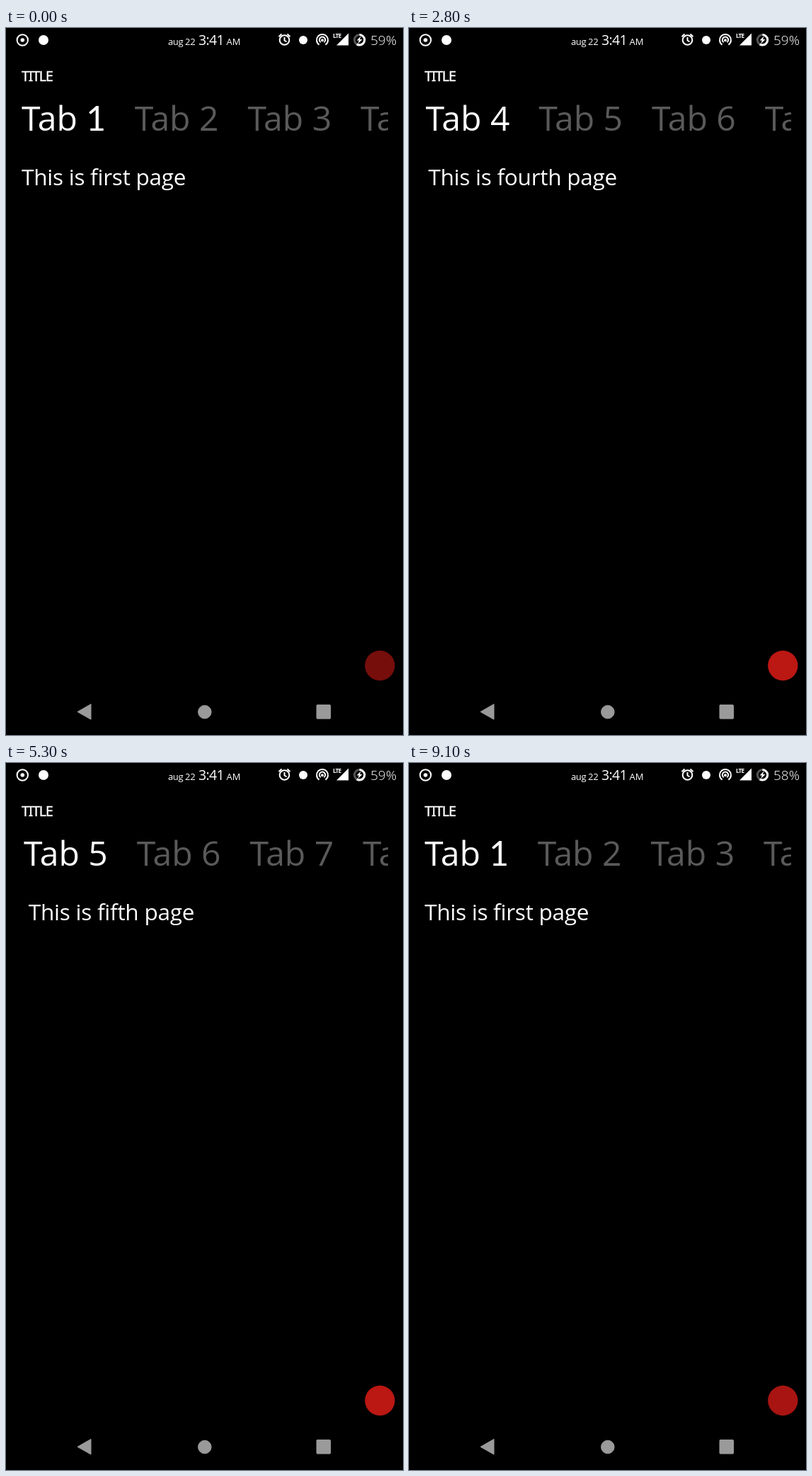
Recreate the animation shown at these times as an HTML page. Size 561x998 px, loop 9.2 s.

```html
<!DOCTYPE html>
<html lang="en">
<head>
<meta charset="utf-8">
<title>Tabs</title>
<style>
html, body { margin: 0; width: 100%; height: 100%; overflow: hidden; background: #000; }
svg { display: block; width: 561px; height: 998px; }
text { font-family: "Open Sans", "Noto Sans", sans-serif; fill: #fff; white-space: pre; }
.thin { font-weight: 300; }
.title { font: 19.5px "Noto Sans", sans-serif; letter-spacing: -1.15px; stroke: #fff; stroke-width: .4px; }
.tab { font-size: 48px; }
.foot { font-family: Lato, sans-serif; }
.page { font-size: 31.5px; letter-spacing: -.25px; }
.line { fill: none; stroke: #fff; stroke-width: 2; }
</style>
</head>
<body>
<svg viewBox="0 0 561 998">
  <defs><clipPath id="view"><rect x="21.5" y="90" width="518.5" height="170"/></clipPath></defs>
  <rect width="561" height="998"/>

  <!-- status bar -->
  <g fill="#fff">
    <circle class="line" cx="23.3" cy="17" r="7.7"/>
    <circle cx="23.3" cy="17" r="2.8"/>
    <circle cx="53" cy="17" r="7"/>
    <text x="229" y="24" font-size="13" letter-spacing="-.4">aug 22</text>
    <text x="272" y="24" font-size="19.5" letter-spacing="-.7">3:41</text>
    <text x="311.5" y="24" font-size="13">AM</text>
    <circle class="line" cx="393.5" cy="17" r="6.8"/>
    <path class="line" d="M385.5 12.2l4-3.6M401.5 12.2l-4-3.6M393.5 13v4.5l3 2" stroke-width="1.6"/>
    <circle cx="420" cy="17" r="6"/>
    <path class="line" d="M442.6 23.6a8 8 0 1 1 8.8 0M444.6 20.2a4.2 4.2 0 1 1 4.8 0"/>
    <circle cx="447" cy="17.2" r="2"/>
    <text x="462" y="14" font-size="8.2" font-weight="700" letter-spacing="-.9">LTE</text>
    <path d="M467 24.5h17v-17z"/>
    <circle class="line" cx="499.5" cy="16.8" r="7.2" style="stroke:#555;stroke-width:3"/>
    <circle class="line" cx="499.5" cy="16.8" r="7.2" pathLength="100" stroke-dasharray="59 100"
      transform="rotate(-90 499.5 16.8)" style="stroke-width:3"/>
    <path d="M501.5 11.5l-6 6h3.2l-1.4 4.8 6.2-6.4h-3.4z"/>
    <text id="charge" class="thin" x="515" y="24" font-size="19">59%</text>
  </g>

  <text class="title" x="22" y="75">TITLE</text>
  <g clip-path="url(#view)">
    <g id="tabs"></g>
    <g id="pages"></g>
  </g>

  <circle id="dot" cx="528.3" cy="900" r="21.2" fill="#bb1713"/>

  <!-- navigation bar -->
  <g fill="#9a9a9a" stroke="#9a9a9a" stroke-linejoin="round">
    <path d="M101 965.3l19-10.9v21.6z"/>
    <circle cx="280.8" cy="965.5" r="9.3"/>
    <rect x="439" y="955.5" width="19.5" height="19.5" rx="1"/>
  </g>
</svg>
<script>
const LOOP = 9200, STEP = 100, TAB_GAP = 159.7, PAGE_GAP = 518;
const ORDINALS = ["first", "second", "third", "fourth", "fifth", "sixth", "seventh", "eighth"];

// start, from, to, duration
const SWIPES = [
  [900, 0, 1, 600], [1615, 1, 2, 600], [2330, 2, 3, 600],
  [2960, 3, 2, 600], [3605, 2, 1, 600],
  [4120, 1, 2, 370], [4490, 2, 3, 370], [4860, 3, 4, 600],
  [5460, 4, 3, 470], [5930, 3, 2, 465], [6395, 2, 1, 600],
  [7600, 1, 0, 600]
];
// header distance left against page distance left on backward swipes
const LAG = [[0, 0], [.034, .19], [.303, .667], [1, 1]];
const PULSE = [[0, 0], [.18, 0], [.45, 1], [.6, 1], [.9, 0], [1, 0]];
const PULSE_PERIOD = 1250, PULSE_START = 2062;

const byId = id => document.getElementById(id);
const tabs = byId("tabs"), pages = byId("pages"), dot = byId("dot"), charge = byId("charge");

function addText(parent, cls, x, y, html) {
  const el = document.createElementNS("http://www.w3.org/2000/svg", "text");
  el.setAttribute("class", cls);
  el.setAttribute("x", x);
  el.setAttribute("y", y);
  el.innerHTML = html;
  parent.append(el);
  return el;
}

const labels = ORDINALS.map((word, i) => {
  const digit = i ? i + 1 : '<tspan class="foot">1</tspan>';
  addText(pages, "page", 22 + i * PAGE_GAP, 222.4, `This is ${word} page`);
  return addText(tabs, "tab", 22 + i * TAB_GAP, 145, "Tab " + digit);
});

function lerpTable(table, x) {
  const i = Math.max(1, table.findIndex(p => p[0] >= x));
  const [x0, y0] = table[i - 1], [x1, y1] = table[i];
  return y0 + (y1 - y0) * (x - x0) / (x1 - x0);
}

function scrollAt(t) {
  const swipe = SWIPES.filter(s => s[0] <= t).pop();
  if (!swipe) return { page: 0, tab: 0 };
  const [start, from, to, time] = swipe;
  const left = (1 - Math.min(1, (t - start) / time)) ** 3;
  const tabLeft = to < from ? lerpTable(LAG, left) : left;
  return { page: to + (from - to) * left, tab: to + (from - to) * tabLeft };
}

function draw(t) {
  const { page, tab } = scrollAt(t);
  const active = Math.round(page);
  tabs.setAttribute("transform", `translate(${-tab * TAB_GAP} 0)`);
  pages.setAttribute("transform", `translate(${-page * PAGE_GAP} 0)`);
  labels.forEach((el, i) => { el.style.fill = i === active ? "#fff" : "#5a5a5a"; });
  const phase = (t - PULSE_START + 2 * PULSE_PERIOD) % PULSE_PERIOD / PULSE_PERIOD;
  dot.setAttribute("opacity", lerpTable(PULSE, phase));
  charge.textContent = t < 8600 ? "59%" : "58%";
}

const begin = performance.now();
function tick() {
  const t = (performance.now() - begin) % LOOP;
  draw(Math.floor(t / STEP) * STEP);
  requestAnimationFrame(tick);
}
draw(0);
requestAnimationFrame(tick);
</script>
</body>
</html>
```
